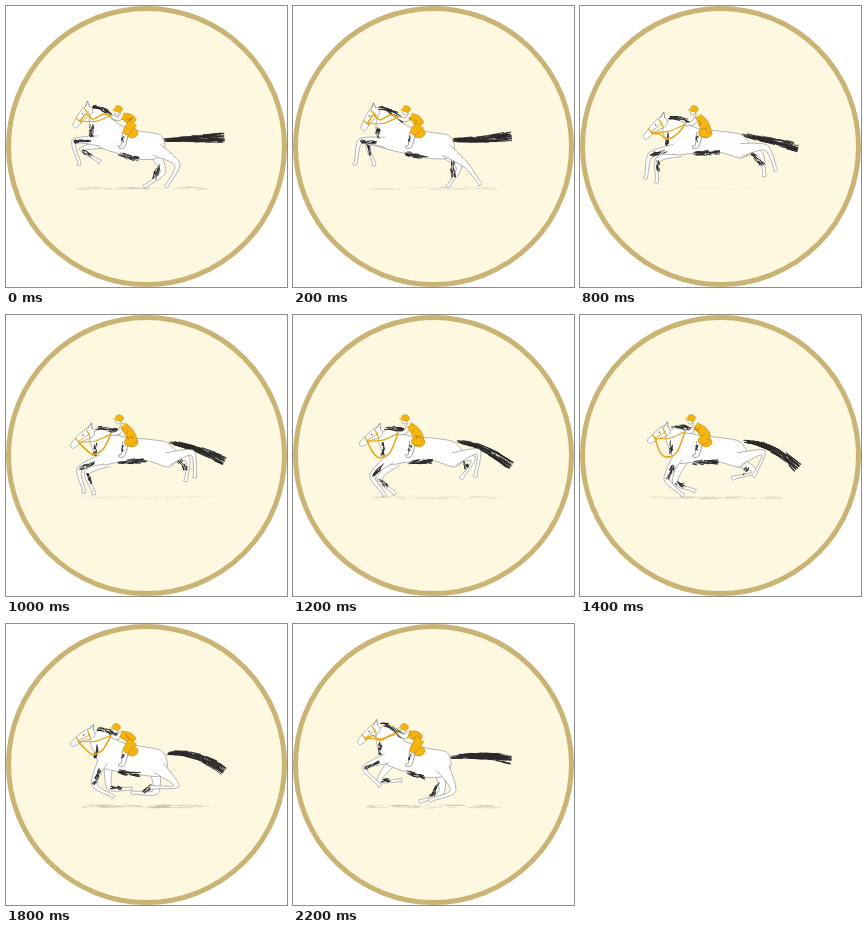
An HTML page with a canvas that plays this animation: 281x281 px, repeating every 2.4 s.

```html
<!DOCTYPE html>
<html lang="en">
<head>
<meta charset="utf-8">
<title>Galloping horse</title>
<style>
html, body { margin: 0; width: 100%; height: 100%; overflow: hidden; background: #fff; }
canvas { display: block; width: 281px; height: 281px; }
</style>
</head>
<body>
<canvas id="stage"></canvas>
<script>
const SIZE = 281, STEP = 200, STEPS = 12, RAD = Math.PI / 180;
const INK = '#29292a', PENCIL = '#969696', GOLD = '#f6b40e', OCHRE = '#c08d1a';

const canvas = document.getElementById('stage');
const ratio = window.devicePixelRatio || 1;
canvas.width = canvas.height = Math.round(SIZE * ratio);
const ctx = canvas.getContext('2d');

let seed = 1;
const rand = () => (seed = seed * 16807 % 2147483647) / 2147483647;
const jitter = w => (rand() - .5) * w;
const lerp = (a, b, t) => [a[0] + (b[0] - a[0]) * t, a[1] + (b[1] - a[1]) * t];
const add = (p, x, y) => [p[0] + x, p[1] + y];

function paint(fill, line, width = .7) {
  if (fill) { ctx.fillStyle = fill; ctx.fill(); }
  if (line) { ctx.strokeStyle = line; ctx.lineWidth = width; ctx.stroke(); }
}

// Rounded path through the points (Catmull-Rom).
function curve(pts, closed) {
  const n = pts.length;
  const at = i => closed ? pts[(i + n) % n] : pts[Math.max(0, Math.min(n - 1, i))];
  ctx.beginPath();
  ctx.moveTo(...pts[0]);
  for (let i = 0; i < (closed ? n : n - 1); i++) {
    const [a, b, c, d] = [at(i - 1), at(i), at(i + 1), at(i + 2)];
    ctx.bezierCurveTo(b[0] + (c[0] - a[0]) / 7, b[1] + (c[1] - a[1]) / 7,
      c[0] - (d[0] - b[0]) / 7, c[1] - (d[1] - b[1]) / 7, c[0], c[1]);
  }
}

function oval([x, y], rx, ry, fill, line, turn = 0) {
  ctx.beginPath();
  ctx.ellipse(x, y, rx, ry, turn, 0, 7);
  paint(fill, line, .6);
}

// Tapered limb, open at its root.
function limb(pts, widths, fill, line) {
  const left = [], right = [];
  pts.forEach(([x, y], i) => {
    const a = pts[Math.max(0, i - 1)], b = pts[Math.min(pts.length - 1, i + 1)];
    const len = Math.hypot(b[0] - a[0], b[1] - a[1]) || 1;
    const nx = -(b[1] - a[1]) / len * widths[i] / 2, ny = (b[0] - a[0]) / len * widths[i] / 2;
    left.push([x + nx, y + ny]);
    right.unshift([x - nx, y - ny]);
  });
  curve(left.concat(right));
  paint(fill, line);
}

// Pencil hatching along a line that bends through m.
function scribble(a, m, c, w0, w1, density = 1.1) {
  const point = (t, off) => {
    const [p, q] = t < .5 ? [a, m] : [m, c];
    const [x, y] = lerp(lerp(a, m, t), lerp(m, c, t), t);
    const len = Math.hypot(q[0] - p[0], q[1] - p[1]) || 1;
    return [x - (q[1] - p[1]) / len * off, y + (q[0] - p[0]) / len * off];
  };
  const count = Math.hypot(c[0] - a[0], c[1] - a[1]) * density;
  for (let i = 0; i < count; i++) {
    const t = rand() * .9, end = Math.min(1, t + .1 + rand() * .2);
    const off = jitter(w0 + (w1 - w0) * t);
    ctx.beginPath();
    ctx.moveTo(...point(t, off));
    ctx.lineTo(...point(end, off + jitter(2)));
    paint(null, INK, .6 + rand() * .5);
  }
}
const hatch = (a, b, w) => scribble(a, lerp(a, b, .5), b, w, w);

// Two equal bones from root to hoof; side picks the way the joint bends.
function leg(root, hoof, bone, side) {
  const dx = hoof[0] - root[0], dy = hoof[1] - root[1], d = Math.hypot(dx, dy);
  const h = Math.sqrt(Math.max(0, bone * bone - d * d / 4)) * side / d;
  const joint = add(lerp(root, hoof, .5), -dy * h, dx * h);
  return [root, joint, lerp(joint, hoof, .85), add(hoof, -1, 0)];
}
const drawLeg = (l, top) => limb(l, [top, 5.5, 3, 4], '#fff', PENCIL);

function stage() {
  ctx.fillStyle = '#fff';
  ctx.fillRect(0, 0, SIZE, SIZE);
  oval([140.5, 140.5], 138, 138, '#fff8e1');
  ctx.beginPath();
  ctx.arc(140.5, 140.5, 138, 0, 7);
  paint(null, '#c9b476', 5);
}

function ground(alpha) {
  ctx.globalAlpha = alpha;
  for (let i = 0; i < 34; i++) {
    const x = 70 + rand() * 125, y = 182.5 + jitter(3);
    ctx.beginPath();
    ctx.moveTo(x, y);
    ctx.lineTo(x + 4 + rand() * 14, y + jitter(1));
    paint(null, '#aaa59a', .6);
  }
  ctx.globalAlpha = 1;
}

function drawHead(at) {
  curve([at(-.05, 0), at(.4, -1.5), at(.8, -1), at(1.06, 0), at(1.1, 4),
    at(.9, 5.5), at(.55, 6), at(.25, 9), at(0, 8)], true);
  paint('#fff', PENCIL);
  ctx.beginPath();
  ctx.moveTo(...at(.05, 0));
  ctx.lineTo(...at(-.2, -1.5));
  ctx.lineTo(...at(-.06, 3));
  paint('#fff', '#666');
  oval(at(.4, 1.5), .8, .7, '#444');
}

function reins(at, sag, hand) {
  const line = (pts, w) => { curve(pts); paint(null, '#e3aa22', w); };
  line([at(.72, -1), at(.75, 5.5)], 1.3);
  line([at(.15, 0), at(.25, 8)], 1.3);
  line([at(.75, 3), at(.15, 5)], 1);
  line([at(.75, 4), add(sag, -4, -5), add(sag, 3, 0), add(sag, 13, -5), hand], 1.6);
  line([at(.72, 4), add(lerp(at(.72, 4), hand, .5), 0, 3), hand], 1.2);
}

function rider(cap, hip, hand) {
  const shoulder = add(cap, 4, 7), knee = [119.5, 127], foot = [117, 140];
  oval([126, 127], 6, 5, GOLD, OCHRE);
  limb([shoulder, add(lerp(shoulder, hand, .5), 1, 3), hand], [5, 4, 2.5], '#fff', '#888');
  limb([knee, foot, add(foot, -4, 1)], [6, 4, 2.5], '#fff', '#777');
  hatch(add(knee, -2, 3), add(foot, -1, -4), 1.5);
  limb([shoulder, add(lerp(shoulder, hip, .5), 1, -1), hip], [6, 9, 8], GOLD, OCHRE);
  limb([hip, knee], [9, 6], GOLD, OCHRE);
  oval(add(cap, -1, 3), 2.8, 3, '#fff', '#888');
  oval(cap, 3.8, 3.2, GOLD, OCHRE, .3);
  limb([cap, add(cap, -6, 1)], [2, 1], GOLD);
  for (let i = 0; i < 5; i++) {
    const p = add(lerp(shoulder, hip, rand()), jitter(5), jitter(4));
    hatchGold(p);
  }
}
function hatchGold(p) {
  ctx.beginPath();
  ctx.moveTo(...p);
  ctx.lineTo(...add(p, jitter(6), jitter(6)));
  paint(null, '#8d6814', .5);
}

function draw(index) {
  const turn = index * 360 / STEPS;
  // Each moving part swings about a rest value and peaks at a given angle of the stride.
  const swing = (rest, amp, peak, angle = turn) => rest + amp * Math.cos((angle - peak) * RAD);
  const stretch = swing(0, 1, 150);

  const poll = [swing(82.3, 3, 225), swing(106, 6.5, 165)];
  const nose = [swing(66.5, 2, 60, 2 * turn), swing(122.5, 6.5, 135)];
  const dx = nose[0] - poll[0], dy = nose[1] - poll[1], len = Math.hypot(dx, dy);
  const at = (t, s) => [poll[0] + dx * t + dy / len * s, poll[1] + dy * t - dx / len * s];

  const chest = [swing(86.5, 3, 220), swing(130.5, 5, 160)];
  const girth = [112, 147.5], belly = [136 + 4 * stretch, swing(149.5, 4, -20)];
  const withers = [115.5 + 2 * stretch, swing(120, 2.3, 120)];
  const rump = [157.5 + 4 * stretch, swing(128, 1.5, 50)];
  const body = [at(.3, 9), chest, add(chest, 7, 14), girth, belly, [157 + 6 * stretch, 152],
    [165 + 7 * stretch, 141], rump, [136 + 3 * stretch, swing(124, 2, 60)], withers, add(poll, 11, 2)];

  const shoulder = add(chest, 8, 9), hip = [156 + 6 * stretch, 144];
  // The leading hind hoof whips back quickly and returns slowly.
  const whip = turn + 34 * Math.sin((turn - 350) * RAD);
  const foreA = leg(shoulder, [swing(83, 27, 250), swing(170, 11.5, 198)], 24, 1);
  const foreB = leg(add(shoulder, 6, 3), [swing(99, 28, 262), swing(168, 12, 165)], 23, 1);
  const hindA = leg(hip, [swing(168, 36, 108, whip), swing(171, 10, 15, whip)], 25, -1);
  const hindB = leg(add(hip, -4, 1), [swing(154, 31, 118), swing(172, 9, 20)], 23, -1);

  const dock = [swing(160, 4, 185), swing(130, 4, 10)];
  const sway = [190, swing(131, 5, 70)], tip = [218, swing(141, 11, 210)];

  seed = 911 + index * 7877;
  ctx.setTransform(canvas.width / SIZE, 0, 0, canvas.height / SIZE, 0, 0);
  ctx.lineCap = ctx.lineJoin = 'round';
  stage();
  ground(swing(.3, .25, 285));
  scribble(dock, sway, tip, 3, 10, 1.6);
  drawLeg(foreB, 9);
  drawLeg(hindB, 12);
  hatch(lerp(hindB[0], hindB[1], .6), lerp(hindB[1], hindB[2], .6), 4);
  hatch(foreB[1], lerp(foreB[1], foreB[2], .6), 3);
  curve(body, true);
  paint('#fff', PENCIL);
  drawLeg(foreA, 10);
  drawLeg(hindA, 13);
  hatch(lerp(foreA[0], foreA[1], .3), foreA[1], 3);
  hatch(add(chest, 2, -8), add(chest, 1, 5), 3);
  hatch(girth, belly, 4);
  scribble(add(poll, 6, 1), add(poll, 16, 0), add(withers, -4, -5), 3, 5);
  drawHead(at);
  const hand = [105, swing(114, 5, 150)];
  rider([swing(112.5, 2, 90), 103], [127, swing(121, 6, 140)], hand);
  reins(at, [84, swing(128, 15, 190)], hand);
}

let shown = -1;
function tick() {
  const index = Math.floor(performance.now() / STEP) % STEPS;
  if (index !== shown) draw(shown = index);
  requestAnimationFrame(tick);
}
tick();
</script>
</body>
</html>
```
